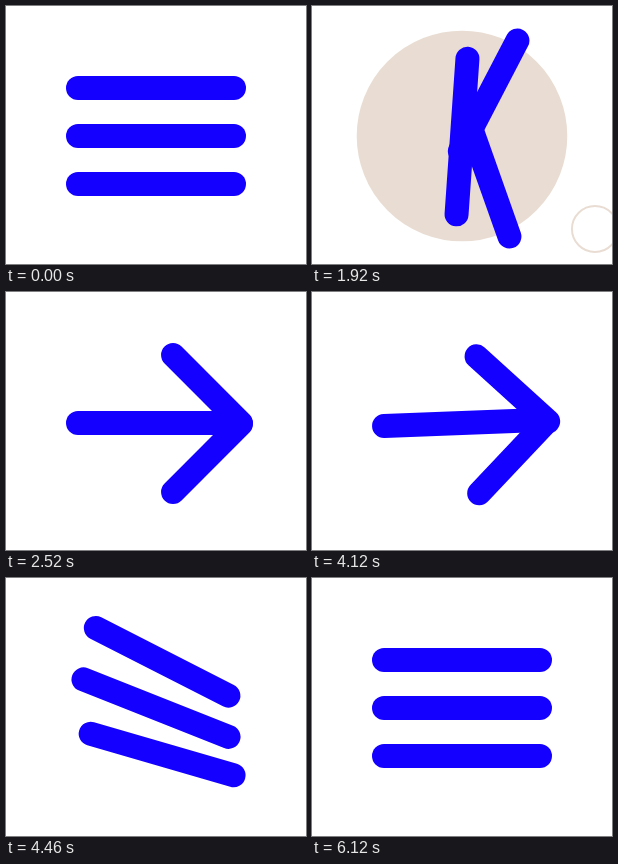
An HTML page that plays this animation: 300x258 px, repeating every 6700 ms.

```html
<!DOCTYPE html>
<html lang="en">
<head>
<meta charset="utf-8">
<title>Menu to arrow</title>
<style>
  html, body { margin: 0; width: 100%; height: 100%; overflow: hidden; background: #fff; }
  svg { display: block; width: 100%; height: 100%; }
  #bars { stroke: #1400ff; stroke-width: 24; stroke-linecap: round; }
  #rings { fill: none; stroke: #e9ddd3; }
</style>
</head>
<body>
<svg viewBox="0 0 300 258">
  <g id="rings">
    <circle cx="150" cy="130"/>
    <circle cx="283" cy="223"/>
  </g>
  <g id="bars"><line/><line/><line/></g>
</svg>
<script>
const LOOP = 6700, MORPH = 670, OPEN = 1755, CLOSE = 4097;

// Menu centre y, arrow centre, arrow angle and arrow length of each bar
const bars = [
  { y: 82, to: [201, 97], turn: 225, len: 96 },
  { y: 130, to: [150, 131], turn: 180, len: 156 },
  { y: 178, to: [201, 166], turn: 135, len: 96 }
];
const lines = document.querySelectorAll('#bars line');
const [big, small] = document.querySelectorAll('#rings circle');

const clamp = v => Math.min(1, Math.max(0, v));
const mix = (a, b, k) => a + (b - a) * k;
const cubicOut = u => 1 - (1 - u) ** 3;

function set(el, attrs) {
  for (const name in attrs) el.setAttribute(name, attrs[name]);
}

// Cubic bezier easing (.2, 0, .1, 1), solved by bisection
function ease(x) {
  if (x <= 0 || x >= 1) return clamp(x);
  const curve = (s, a, b) => 3 * (1 - s) ** 2 * s * a + 3 * (1 - s) * s * s * b + s ** 3;
  let lo = 0, hi = 1;
  for (let i = 0; i < 30; i++) {
    const mid = (lo + hi) / 2;
    if (curve(mid, 0.2, 0.1) < x) lo = mid; else hi = mid;
  }
  return curve(lo, 0, 1);
}

function drawBar(line, bar, p) {
  const x = mix(150, bar.to[0], p), y = mix(bar.y, bar.to[1], p);
  const half = mix(156, bar.len, p) / 2;
  const angle = bar.turn * p * Math.PI / 180;
  const dx = half * Math.cos(angle), dy = half * Math.sin(angle);
  set(line, { x1: x - dx, y1: y - dy, x2: x + dx, y2: y + dy });
}

function drawRing(el, outer, width, u) {
  const on = u > 0 && u < 1;
  el.style.display = on ? '' : 'none';
  if (on) set(el, { r: outer - width / 2, 'stroke-width': width });
}

function draw(t) {
  const p = t < CLOSE ? ease((t - OPEN) / MORPH) : 1 - ease((t - CLOSE) / MORPH);
  bars.forEach((bar, i) => drawBar(lines[i], bar, p));

  const u = clamp((t - OPEN) / 500);
  const outer = 150 * cubicOut(u);
  const hole = cubicOut(clamp((u - 0.36) / 0.64));
  drawRing(big, outer, outer * (1 - hole), u);

  const v = clamp((t - OPEN) / 220);
  const rim = 24.4 * cubicOut(v);
  drawRing(small, rim, Math.min(rim, 8 * (1 - v)), v);
}

const start = performance.now();
function tick() {
  draw((performance.now() - start) % LOOP);
  requestAnimationFrame(tick);
}
draw(0);
requestAnimationFrame(tick);
</script>
</body>
</html>
```
